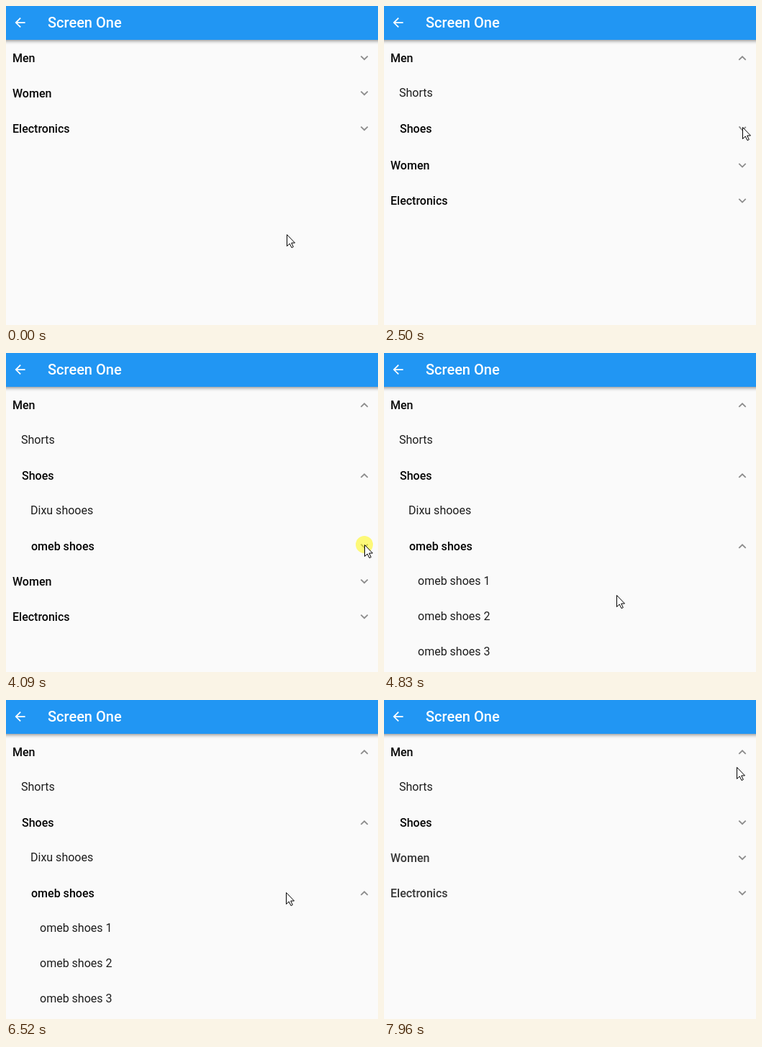
Animation of 517x443 px, one loop 8000 ms. Source, as an HTML page with a canvas:

```html
<!DOCTYPE html>
<html lang="en">
<head>
<meta charset="utf-8">
<title>Expandable list</title>
<style>
  html, body { margin: 0; height: 100%; overflow: hidden; background: #fafafa; }
  canvas { display: block; }
</style>
</head>
<body>
<canvas id="stage" width="517" height="443"></canvas>
<script>
const ctx = document.getElementById('stage').getContext('2d');
const W = 517, H = 443, LOOP = 8000;
const BAR = 47, ROW = 49, INDENT = 13;
const TOGGLE = 200, PRESS = 190;

// Click times
const MEN = 1310, SHOES = 2480, BRAND = 4110, SHOES_CLOSE = 7380;
const clicks = [MEN, SHOES, BRAND, SHOES_CLOSE];
const drag = { from: 5820, to: 6250 };

const leaf = text => ({ text });
const group = (text, open, close, ...kids) => ({ text, open, close, kids });
const list = [
  group('Men', MEN, Infinity,
    leaf('Shorts'),
    group('Shoes', SHOES, SHOES_CLOSE,
      leaf('Dixu shooes'),
      group('omeb shoes', BRAND, Infinity,
        ...[1, 2, 3].map(n => leaf('omeb shoes ' + n))))),
  group('Women', Infinity, Infinity),
  group('Electronics', Infinity, Infinity)
];

// Pointer moves; it rests between them
const move = (from, to, x, y) => ({ from, to, x, y });
const toChevron = (from, to, row) => move(from, to, 498, 70 + row * ROW);
const moves = [
  move(0, 0, 390, 317),
  toChevron(50, 750, 0),
  toChevron(1480, 2130, 2),
  toChevron(2940, 3800, 4),
  move(4190, 4830, 323, 336),
  move(5030, 5200, 322, 355),
  move(5200, 5670, 331, 93),
  move(5780, drag.from, 327, 113),
  move(drag.from, drag.to, 298, 369),
  move(drag.to, 6840, 506, 136),
  toChevron(6840, 7050, 2),
  move(7500, 7960, 490, 93)
];

const backArrow = new Path2D('M20 11H7.83l5.59-5.59L12 4l-8 8 8 8 1.41-1.41L7.83 13H20z');
const chevron = new Path2D('M-4.7-2.6L0 2 4.7-2.6');
const arrow = new Path2D('M.5.5V16.5L4.2 13 7 18.6 9.3 17.5 6.7 12H11.5Z');

const clamp = v => Math.min(1, Math.max(0, v));
const easeIn = v => v ** 1.67;
const smooth = v => v * v * (3 - 2 * v);

function openness(item, t) {
  if (!item.kids) return 0;
  const v = t < item.close ? (t - item.open) / TOGGLE : 1 - (t - item.close) / TOGGLE;
  return easeIn(clamp(v));
}

const kidsHeight = (item, t) => item.kids.reduce((sum, kid) => sum + height(kid, t), 0);

function height(item, t) {
  const f = openness(item, t);
  return ROW + (f && f * kidsHeight(item, t));
}

function label(text, x, y, size, weight, color) {
  ctx.font = `${weight} ${size}px Roboto, sans-serif`;
  ctx.fillStyle = color;
  ctx.fillText(text, x, y);
}

function drawItem(item, y, depth, t) {
  const mid = y + ROW / 2, x = 8 + depth * INDENT;
  if (!item.kids) {
    label(item.text, x, mid + 5.5, 16, 400, '#1d1d1d');
    return;
  }
  const faded = !item.kids.length && t > SHOES_CLOSE + TOGGLE / 2;
  label(item.text, x + 1, mid + 6.5, 16, 500, faded ? '#363636' : '#050505');

  const f = openness(item, t);
  ctx.save();
  ctx.translate(498, mid + .75);
  ctx.rotate(f * Math.PI);
  ctx.strokeStyle = '#8c8c8c';
  ctx.lineWidth = 1.8;
  ctx.stroke(chevron);
  ctx.restore();

  if (!f) return;
  // Children stay centred in the clip while it grows or shrinks
  const full = kidsHeight(item, t);
  ctx.save();
  ctx.beginPath();
  ctx.rect(0, y + ROW, W, full * f);
  ctx.clip();
  drawItems(item.kids, y + ROW - full * (1 - f) / 2, depth + 1, t);
  ctx.restore();
}

function drawItems(items, y, depth, t) {
  for (const item of items) {
    drawItem(item, y, depth, t);
    y += height(item, t);
  }
}

function drawBar() {
  ctx.save();
  ctx.shadowColor = 'rgba(0,0,0,.45)';
  ctx.shadowBlur = 5;
  ctx.shadowOffsetY = 1.5;
  ctx.fillStyle = '#2196f3';
  ctx.fillRect(-10, -10, W + 20, BAR + 10);
  ctx.restore();

  ctx.save();
  ctx.translate(9, 12.5);
  ctx.scale(.88, .88);
  ctx.fillStyle = '#fff';
  ctx.fill(backArrow);
  ctx.restore();
  label('Screen One', 58, 30, 20, 500, '#fff');
}

function pointerAt(t) {
  let { x, y } = moves[0];
  for (const m of moves.slice(1)) {
    const k = smooth(clamp((t - m.from) / (m.to - m.from)));
    x += (m.x - x) * k;
    y += (m.y - y) * k;
  }
  return [Math.round(x), Math.round(y)];
}

function drawPointer(t) {
  const [x, y] = pointerAt(t);
  const pressed = clicks.some(c => t >= c - PRESS && t < c) || (t >= drag.from && t < drag.to);
  if (pressed) {
    ctx.fillStyle = 'rgba(255,248,0,.52)';
    ctx.beginPath();
    ctx.arc(x, y, 12, 0, 7);
    ctx.fill();
  }
  ctx.save();
  ctx.translate(x, y);
  ctx.fillStyle = '#fff';
  ctx.strokeStyle = '#000';
  ctx.lineWidth = 1;
  ctx.fill(arrow);
  ctx.stroke(arrow);
  ctx.restore();
}

function render(now) {
  const t = now % LOOP;
  ctx.fillStyle = '#fafafa';
  ctx.fillRect(0, 0, W, H);
  drawItems(list, BAR, 0, t);
  drawBar();
  drawPointer(t);
}

const start = performance.now();
(function frame() {
  render(performance.now() - start);
  requestAnimationFrame(frame);
})();
</script>
</body>
</html>
```
